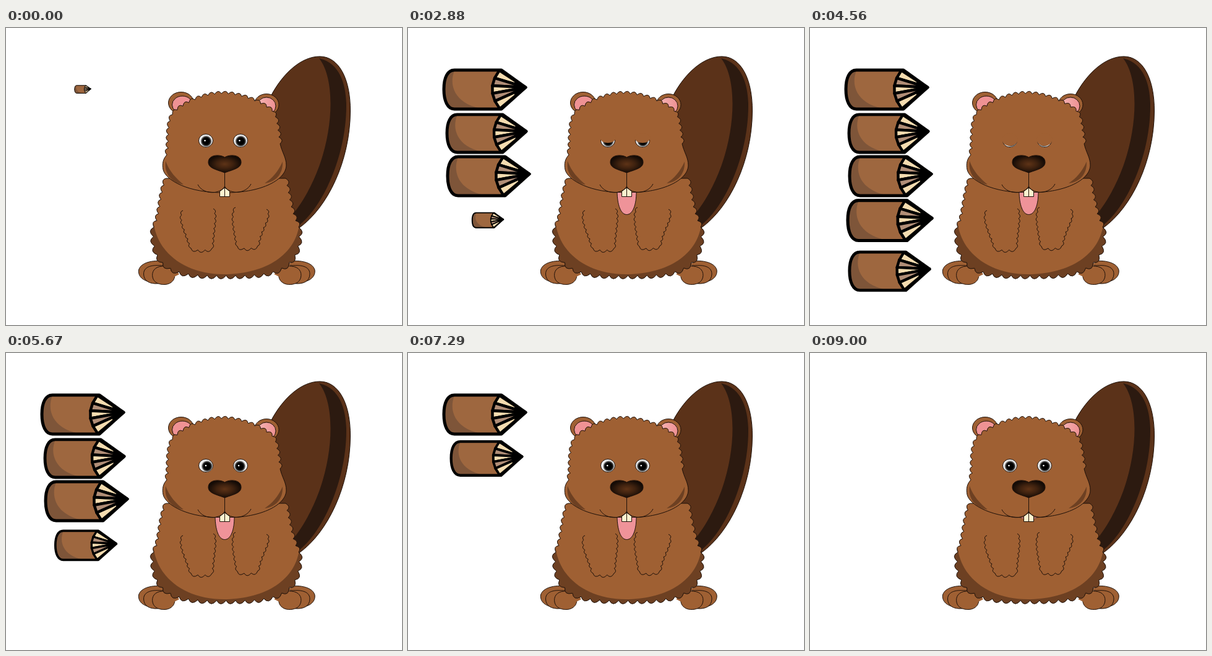
An HTML page for the animation above (9600 ms loop, 640 px wide and 480 px high).

```html
<!DOCTYPE html>
<html lang="en">
<head>
<meta charset="utf-8">
<title>Beaver and pencils</title>
<style>
  html, body { margin: 0; width: 100%; height: 100%; overflow: hidden; background: #fff; }
  svg { display: block; width: 100%; height: 100%; }
  .line { fill: none; stroke: #1d1009; stroke-width: 1; }
  .skin { fill: #9f6033; }
  .dark { fill: #6d4022; }
  .edge { stroke: #1d1009; stroke-width: 1; }
</style>
</head>
<body>
<svg viewBox="0 0 640 480">
  <defs>
    <radialGradient id="noseFill">
      <stop offset="0" stop-color="#5e3317"/>
      <stop offset=".5" stop-color="#3f220f"/>
      <stop offset="1" stop-color="#140b06"/>
    </radialGradient>
    <radialGradient id="pupilFill">
      <stop offset=".5" stop-color="#000"/>
      <stop offset=".72" stop-color="#303030"/>
      <stop offset="1" stop-color="#bbb" stop-opacity="0"/>
    </radialGradient>
    <linearGradient id="earFill">
      <stop offset="0" stop-color="#f5b5b5"/>
      <stop offset="1" stop-color="#ee9092"/>
    </linearGradient>
    <clipPath id="bodyClip"><path class="bodyShape"/></clipPath>
    <g id="foot" class="skin edge">
      <path d="M252 377C240 375 218 378 214.500 391C213 402 222 409 236 411L260 408Z"/>
      <path d="M258 385C242 382 222 383 222.500 398C223 409 232 414 246 413"/>
      <path d="M252 385C240 386 235 394 237 403C239 412 248 415 257 414.500C268 414 275 405 272 396L262 384Z"/>
      <path d="M247 378L270 384 280 398 270 403 258 386Z" stroke="none"/>
    </g>
    <path id="pencilBody" d="M-49-31H27L66-3 27 32H-49C-60 32-66 19-66 0S-60-31-49-31Z"/>
    <g id="pencil" stroke="#000" stroke-linejoin="round">
      <use href="#pencilBody" fill="#9e673f" stroke="none"/>
      <path d="M-49-30C-58-8-50 22-7 31H-49C-60 31-66 19-66 0S-60-30-49-30Z" fill="#7e5539" stroke="none"/>
      <g id="slices" stroke-width="4.500"></g>
      <path d="M48-16L67-3 48 11Z" stroke="none"/>
      <use href="#pencilBody" fill="none" stroke-width="5"/>
    </g>
  </defs>

  <g id="pencils"></g>

  <path fill="#5b3219" class="edge" d="M428 110C448 72 478 46 507 46C538 46 557 82 556.500 135C556 215 520 290 474 323L440 300Z"/>
  <path fill="#2c1a10" d="M506 49C535 85 530 185 490 260C482 276 472 291 462 303L472 320C512 290 551 205 550 122C549 88 538 56 506 49Z"/>

  <use href="#foot"/>
  <use href="#foot" transform="matrix(-1 0 0 1 713.500 0)"/>

  <path class="bodyShape dark"/>
  <path class="skin" clip-path="url(#bodyClip)" d="M230 230H480V300L474 318C466 372 412 398 352 398C292 398 247 366 239 318L230 300Z"/>
  <path class="bodyShape line"/>
  <path id="arms" class="line"/>

  <g class="edge">
    <ellipse class="skin" cx="283" cy="121" rx="20.500" ry="17.500"/>
    <ellipse fill="#ef9294" cx="285" cy="124" rx="16.500" ry="14"/>
    <ellipse class="skin" cx="421" cy="124" rx="20" ry="17.500"/>
    <ellipse fill="url(#earFill)" cx="421" cy="126" rx="15" ry="14"/>
  </g>
  <path id="headFill" class="skin"/>
  <path id="headFur" class="line"/>
  <path class="line" d="M260 205C254 211 252 219 254 229C258 246 295 267 353 266C407 267 452 248 453 222C453 209 446 201 443 187"/>
  <path class="dark" d="M258 215C255 234 267 251 287 253C275 243 264 232 258 215ZM447 216C448 236 436 249 418 251C430 243 440 232 447 216Z"/>

  <path id="tongue" fill="#ef9399" class="edge" d="M-15.500 0H15.500C15.500 20 10 36 0 36C-10 36-15 20-15.500 0Z"/>
  <path class="line" d="M310 253C318 269 345 270 353.500 256C362 270 388 268 396 252"/>
  <path fill="#fff3cf" class="edge" d="M345.500 264L353.500 258 361.500 264V272.500H345.500Z"/>
  <path class="line" d="M353.500 233V272"/>
  <path fill="url(#noseFill)" class="edge" d="M353.500 209C361 204 380 204 380 217C380 227 366 229 353.500 234C341 229 327 227 327 217C327 204 346 204 353.500 209Z"/>
  <g id="eyes"></g>
</svg>
<script>
const FRAME = 30, LAST = 9000, LOOP = 9600, STEP = 900;
const RESIZE = 840, MIN_SCALE = 0.2, SHRINK_START = 4480;
const LID_CLOSED = 4560, LID_OPEN = 5520, LID_DROP = 20.5;
const $ = id => document.getElementById(id);
const clamp = v => Math.max(0, Math.min(1, v));

// Follows a curve with tufts that bulge to the left of its direction.
function fur(curve, step, bulge) {
  const guide = document.createElementNS('http://www.w3.org/2000/svg', 'path');
  guide.setAttribute('d', curve);
  const length = guide.getTotalLength(), count = Math.round(length / step);
  let from = guide.getPointAtLength(0), d = `L${from.x} ${from.y}`;
  for (let i = 1; i <= count; i++) {
    const to = guide.getPointAtLength(length * i / count);
    const dx = to.x - from.x, dy = to.y - from.y, out = 2 * bulge / Math.hypot(dx, dy);
    d += `Q${from.x + dx * 0.6 + dy * out} ${from.y + dy * 0.6 - dx * out} ${to.x} ${to.y}`;
    from = to;
  }
  return d;
}
const outline = (...parts) => parts.join('').replace('L', 'M');

const body = outline(
  fur('M473 322C480 400 420 400 354 400C290 400 232 400 239 322', 15, 5.5),
  fur('M239 322C250 305 248 270 259 243', 12, 4),
  fur('M452 243C457 270 461 300 473 322', 12, 4)) + 'Z';
document.querySelectorAll('.bodyShape').forEach(p => p.setAttribute('d', body));

const crown = outline(fur('M260 205C266 190 258 160 270 138C288 122 320 106 350 106C380 106 418 122 434 138C440 160 440 175 443 187', 11, 4));
$('headFur').setAttribute('d', crown);
$('headFill').setAttribute('d', crown + 'C446 201 453 209 453 222C452 248 407 267 353 266C295 267 258 246 254 229C252 219 254 211 260 205Z');

const arm = (down, toes, up) => outline(fur(down, 8, 2.5), fur(toes, 11, 4), fur(up, 8, 2.5));
$('arms').setAttribute('d',
  arm('M335 292C341 305 333 330 333 356', 'M333 356Q316 362 299 356', 'M299 356C292 330 278 310 286 295') +
  arm('M421 293C430 305 410 325 407 352', 'M407 352Q391 360 374 353', 'M374 353C371 330 363 305 371 290'));

const SLICES = 5;
const cut = k => {
  const y = 62 * k / SLICES - 30.5;
  return `${12 + 12 * (y / 31) ** 2} ${y}`;
};
$('slices').innerHTML = Array.from({ length: SLICES }, (_, k) =>
  `<path fill="${k % 2 ? '#b18e77' : '#f4dcb0'}" d="M${cut(k)}L${cut(k + 1)}L66-3Z"/>`).join('');

const pencils = [
  { x: 124, y: 99, size: 1 },
  { x: 127, y: 170, size: 0.97 },
  { x: 130, y: 239, size: 1 },
  { x: 129, y: 310.5, size: 1.03 },
  { x: 128.5, y: 392.5, size: 1.06 }
].map((pencil, i, all) => {
  $('pencils').insertAdjacentHTML('beforeend', '<use href="#pencil"/>');
  const grow = i * STEP, shrink = SHRINK_START + (all.length - 1 - i) * STEP;
  return { ...pencil, grow, shrink, node: $('pencils').lastElementChild };
});

const eyes = [{ x: 323, inward: 1 }, { x: 379, inward: -1 }].map(({ x, inward }) => {
  $('eyes').insertAdjacentHTML('beforeend', `<g>
    <ellipse cx="${x}" cy="182" rx="11.500" ry="10.500" fill="#f4f4f4" class="edge"/>
    <g><circle cx="${x + 0.5}" cy="183" r="10" fill="url(#pupilFill)"/>
    <circle cx="${x - 1.5}" cy="182" r="1.300" fill="#fff"/></g>
    <ellipse class="skin" cx="${x}" rx="12.500"/></g>`);
  const [, pupil, lid] = $('eyes').lastElementChild.children;
  return { pupil, lid, inward };
});

function drawPencil({ x, y, size, grow, shrink, node }, t) {
  const amount = clamp((t - grow) / RESIZE) - clamp((t - shrink) / RESIZE);
  const scale = size * (MIN_SCALE + (1 - MIN_SCALE) * amount);
  const visible = t >= grow && t < shrink + RESIZE + FRAME;
  node.setAttribute('visibility', visible ? 'visible' : 'hidden');
  node.setAttribute('transform', `translate(${x} ${y}) scale(${scale})`);
}

function drawEyes(t) {
  const closing = 1 - (1 - clamp(t / LID_CLOSED)) ** 1.45;
  const opening = clamp((t - LID_CLOSED) / (LID_OPEN - LID_CLOSED));
  const drop = LID_DROP * (closing - opening);
  const shift = t < LID_CLOSED ? 0 : 1.5 * (1 - clamp((t - LID_OPEN) / (LAST - LID_OPEN)));
  for (const { pupil, lid, inward } of eyes) {
    lid.setAttribute('cy', 170 + drop / 2);
    lid.setAttribute('ry', drop / 2);
    pupil.setAttribute('transform', `translate(${shift * inward} 0)`);
  }
}

function drawTongue(t) {
  const out = clamp(t / STEP) - 0.92 * clamp((t - LAST + STEP) / STEP);
  $('tongue').setAttribute('transform', `translate(353.500 265.500) scale(${0.85 + 0.15 * out} ${out})`);
}

const start = performance.now();
function tick() {
  const t = Math.min(LAST, Math.floor((performance.now() - start) % LOOP / FRAME) * FRAME);
  pencils.forEach(pencil => drawPencil(pencil, t));
  drawEyes(t);
  drawTongue(t);
  requestAnimationFrame(tick);
}
tick();
</script>
</body>
</html>
```
